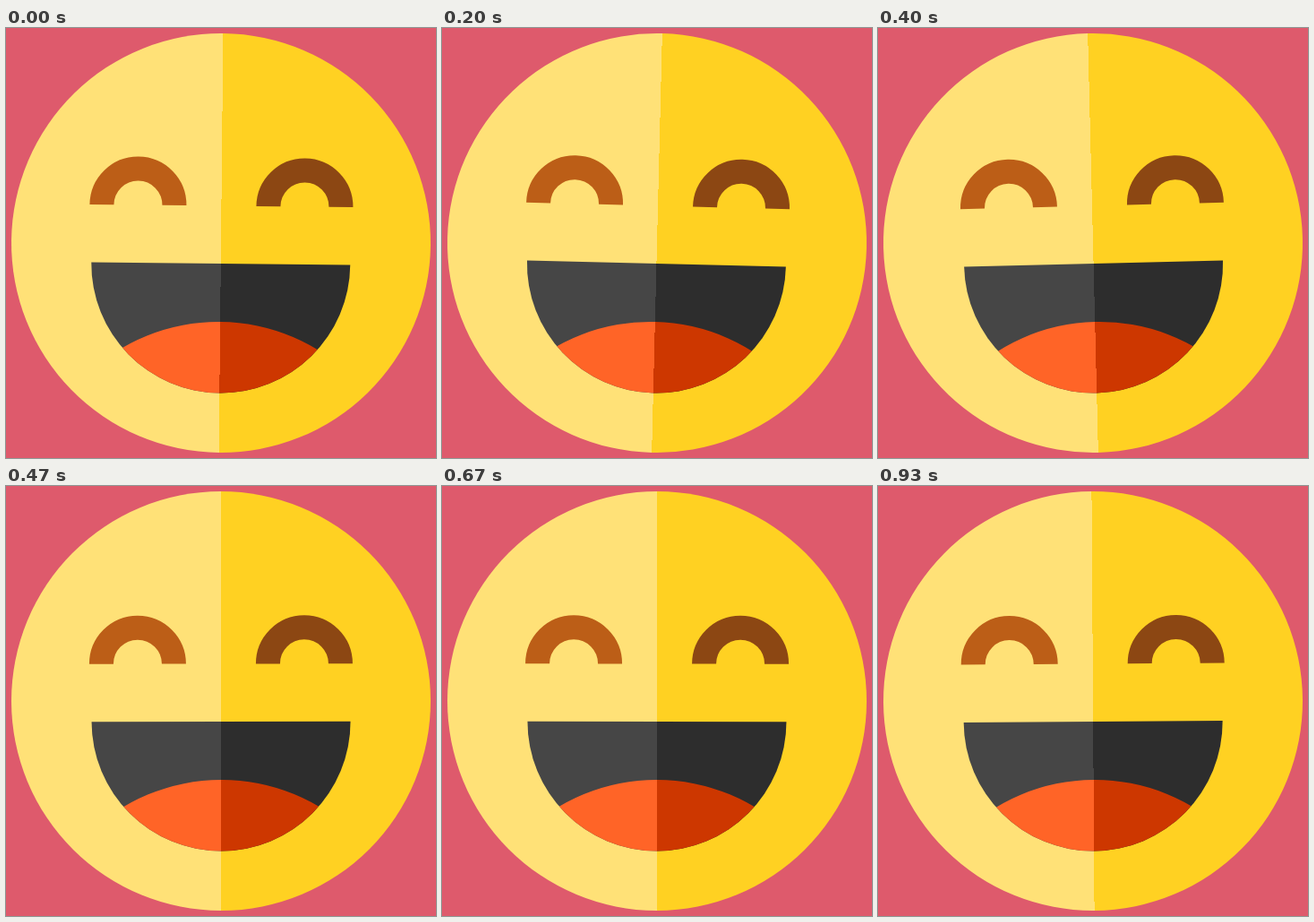
Write an HTML page with a canvas that moves like this. It is 480x480 px and loops after 0.99 s.

```html
<!DOCTYPE html>
<html lang="en">
<head>
<meta charset="utf-8">
<title>Laughing face</title>
<style>
html, body { margin: 0; width: 100%; height: 100%; overflow: hidden; background: #de5a6c; }
canvas { display: block; width: 480px; height: 480px; }
</style>
</head>
<body>
<canvas id="stage" width="480" height="480"></canvas>
<script>
const ctx = document.getElementById("stage").getContext("2d");
const LOOP = 990;
const STEPS = 15;
// Rocking angle in degrees at fractions of the loop
const ROCK = [[0, 0], [0.1, 2.06], [0.2, 2], [0.4, -2], [0.6, 2], [0.8, -2], [1, 0]];

function stepAt(ms) {
  let step = STEPS - 1;
  while (step > 0 && Math.round(step * 20 / 3) * 10 > ms) step--;
  return step;
}

function rockAngle(x) {
  const i = ROCK.findIndex(([at]) => at > x);
  const [x0, a0] = ROCK[i - 1];
  const [x1, a1] = ROCK[i];
  return a0 + (a1 - a0) * (x - x0) / (x1 - x0);
}

function disc(x, y, r) {
  ctx.beginPath();
  ctx.arc(x, y, r, 0, Math.PI * 2);
}

// Fills the current path in two tones, split down the middle of the face
function fillSplit(left, right) {
  const tone = ctx.createLinearGradient(-240, 0, 240, 0);
  tone.addColorStop(0, left);
  tone.addColorStop(0.5, left);
  tone.addColorStop(0.5, right);
  tone.addColorStop(1, right);
  ctx.fillStyle = tone;
  ctx.fill();
}

function drawEye(x, color) {
  ctx.beginPath();
  ctx.arc(x, -41.5, 40.5, Math.PI, 0);
  ctx.lineWidth = 27;
  ctx.strokeStyle = color;
  ctx.stroke();
}

function drawMouth() {
  ctx.save();
  ctx.beginPath();
  ctx.arc(0, 23, 144.5, 0, Math.PI);
  ctx.closePath();
  fillSplit("#464646", "#2d2d2d");
  ctx.clip();
  disc(0, 301, 213);
  fillSplit("#ff6427", "#cd3700");
  ctx.restore();
}

function draw(ms) {
  const x = (stepAt(ms) + 0.5) / STEPS - 0.005;
  ctx.fillStyle = "#de5a6c";
  ctx.fillRect(0, 0, 480, 480);
  ctx.save();
  ctx.translate(240, 240);
  ctx.rotate(rockAngle(x) * Math.PI / 180);
  disc(0, 0, 234);
  fillSplit("#ffe177", "#ffd122");
  drawEye(-93, "#bc5e17");
  drawEye(93, "#8c4713");
  drawMouth();
  ctx.restore();
}

const start = performance.now();
function tick() {
  draw((performance.now() - start) % LOOP);
  requestAnimationFrame(tick);
}
tick();
</script>
</body>
</html>
```
